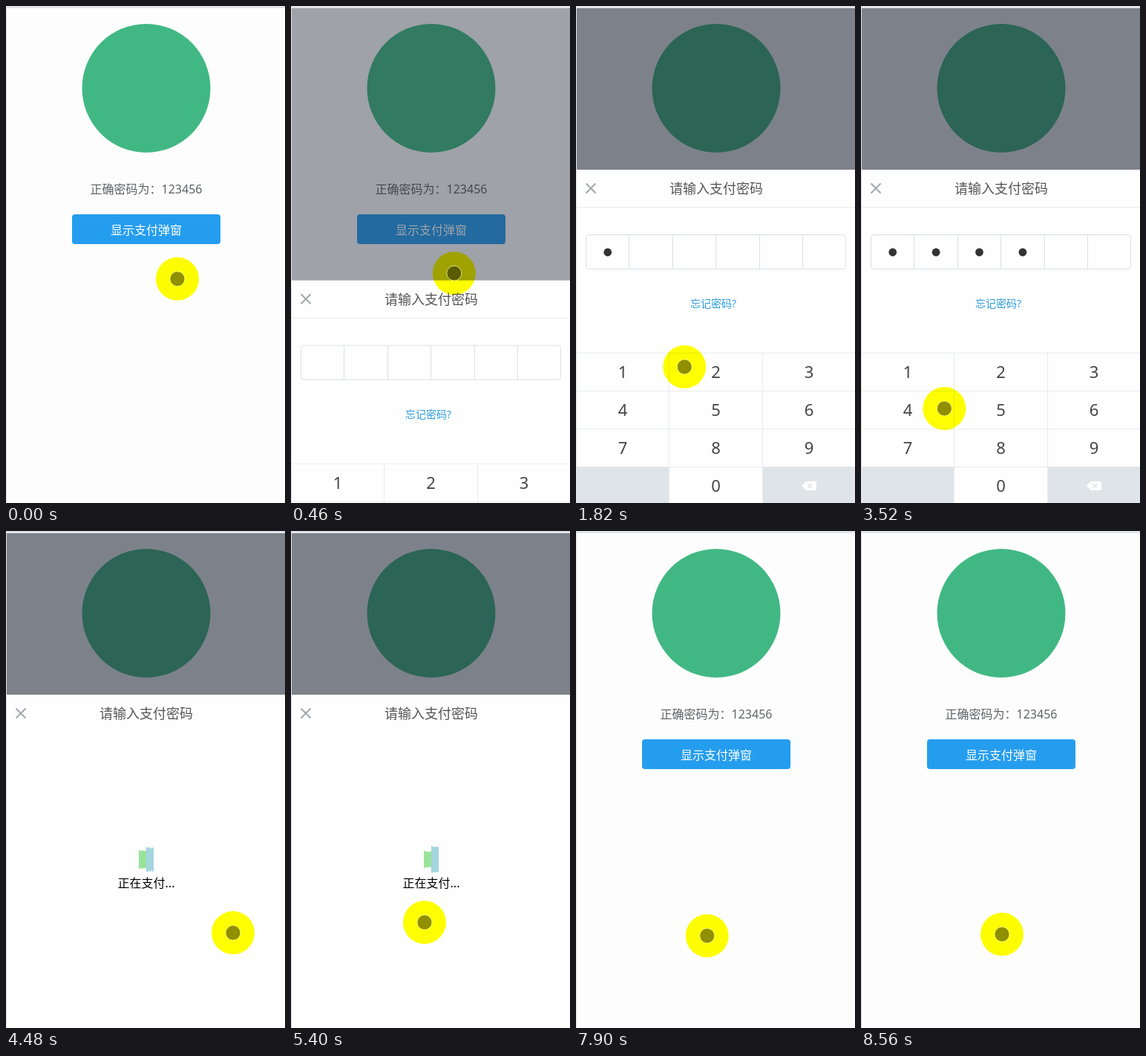
An HTML page for the animation above (8580 ms loop, 376x668 px).

```html
<!DOCTYPE html>
<html lang="zh-CN">
<head>
<meta charset="utf-8">
<title>支付弹窗</title>
<style>
  html, body { margin: 0; height: 100%; overflow: hidden; background: #fdfdfd; }
  svg { display: block; width: 100%; height: 100%; }
  text { font: 16px "Noto Sans", "Noto Sans CJK SC", "Noto Sans CJK", sans-serif; text-anchor: middle; }
  .line { fill: none; stroke: #e9ebed; }
  .key { font-size: 22px; fill: #444; }
  .glow { mix-blend-mode: multiply; }
</style>
</head>
<body>
<svg viewBox="0 0 376 668">
  <rect width="376" height="668" fill="#fdfdfd"/>
  <circle cx="189" cy="110.5" r="86.5" fill="#41b883"/>
  <text x="189" y="252" fill="#606266">正确密码为：123456</text>
  <rect x="89" y="280" width="200" height="40" rx="4" fill="#259def"/>
  <text x="189" y="307" fill="#fff">显示支付弹窗</text>
  <rect id="shade" width="376" height="668" fill="rgb(29,37,51)"/>

  <g id="sheet">
    <rect y="220" width="376" height="448" fill="#fefefe"/>
    <path d="M13.5 238.5l13 13m0-13l-13 13" stroke="#a3a7ad" stroke-width="2"/>
    <text x="189" y="252" style="font-size:18px" fill="#555">请输入支付密码</text>

    <g id="entry">
      <path class="line" d="M1 270.5h375"/>
      <rect x="13.5" y="307.5" width="350" height="46" rx="4" fill="none" stroke="#dcdfe2"/>
      <g id="cells"></g>
      <text x="185" y="405" style="font-size:14px" fill="#2a9cdb">忘记密码?</text>
      <path d="M1 619h125v49H1zM252 619h124v49H252z" fill="#dfe4e9"/>
      <path class="line" d="M1 466.5h375M1 517.5h375M1 568.5h375M1 619.5h375M125.5 466v202M251.5 466v202"/>
      <g id="keys"></g>
      <path d="M304 645l6-6h12q2 0 2 2v8q0 2-2 2h-12z" fill="#fff"/>
      <path d="M312 642l6 6m0-6l-6 6" stroke="#dfe4e9" stroke-width="1.5"/>
    </g>

    <g id="loading">
      <path id="barA" fill="#98e39a"/>
      <path id="barB" fill="#a5d5de"/>
      <text x="189" y="479">正在支付...</text>
    </g>

    <g id="success">
      <circle cx="189" cy="440" r="21" fill="#29dcb0"/>
      <path d="M178.5 440.5l7.5 7 13.5-14.5" fill="none" stroke="#fff" stroke-width="4" stroke-linecap="round"/>
      <text x="189" y="495">支付成功</text>
    </g>
  </g>

  <path d="M0 0H376V3H1V668H0z" fill="#e3e4e7"/>
  <g id="glow" class="glow">
    <circle r="29" fill="#ff0"/>
    <circle r="10" fill="#909000"/>
  </g>
  <circle id="ring" r="10" fill="none" stroke="#ffff9a" stroke-opacity=".75"/>
</svg>
<script>
const LOOP = 8580, SLIDE = 400, OPEN = 305, CLOSE = 7480, PAY = 4260, DONE = 6000;
const presses = [1500, 2100, 2620, 3300, 3820, 4200];
// time, x, y
const track = [
  [0, 231, 367], [230, 222, 308], [310, 222, 308], [460, 220, 359],
  [1300, 88, 487], [1520, 88, 487], [1820, 146, 485], [2020, 185, 487],
  [2150, 185, 487], [2500, 325, 490], [2680, 325, 490], [3200, 94, 541],
  [3380, 94, 541], [3520, 112, 541], [3750, 192, 541], [3880, 192, 541],
  [4120, 309, 541], [4400, 309, 541], [5180, 280, 532], [5400, 180, 526],
  [5600, 175, 527], [7240, 175, 527], [7260, 165, 538], [7700, 170, 545],
  [8300, 190, 542], [LOOP, 190, 542]
];
const $ = id => document.getElementById(id);
const clamp = v => Math.max(0, Math.min(1, v));
const show = (el, on) => el.style.display = on ? '' : 'none';

function add(parent, tag, attrs, label = '') {
  const el = document.createElementNS('http://www.w3.org/2000/svg', tag);
  for (const k in attrs) el.setAttribute(k, attrs[k]);
  el.textContent = label;
  parent.append(el);
  return el;
}

const dots = presses.map((_, i) => {
  const x = 13.5 + i * 58.4;
  if (i) add($('cells'), 'path', { d: `M${Math.floor(x) + .5} 308v45`, stroke: '#dcdfe2' });
  return add($('cells'), 'circle', { cx: x + 29.2, cy: 331, r: 5.4, fill: '#333' });
});
for (let n = 1; n <= 10; n++) {
  const i = n < 10 ? n - 1 : 10;
  add($('keys'), 'text', { class: 'key', x: 63 + i % 3 * 125.5, y: 500 + Math.floor(i / 3) * 51 }, n % 10);
}

function cursorAt(t) {
  const i = track.findIndex(p => p[0] > t);
  const a = track[i - 1], b = track[i], u = (t - a[0]) / (b[0] - a[0]);
  return [a[1] + (b[1] - a[1]) * u, a[2] + (b[2] - a[2]) * u];
}

const easeOut = (t, start, power) => 1 - (1 - clamp((t - start) / SLIDE)) ** power;
const opened = (t, power) => easeOut(t, OPEN, power) - easeOut(t, CLOSE, power);

// A bar of thin strips with uneven ends
function bar(id, x, height) {
  let d = '';
  for (let i = 0; i < 5; i++) {
    const h = height - (i * 3 % 5) * .8;
    d += `M${x + i * 2} ${441.5 - h / 2}h2v${h}h-2z`;
  }
  $(id).setAttribute('d', d);
}

function draw(t) {
  $('shade').setAttribute('opacity', .57 * opened(t, 2.67));
  $('sheet').setAttribute('transform', `translate(0 ${448 * (1 - opened(t, 2.23))})`);
  show($('entry'), t < PAY);
  show($('loading'), t >= PAY && t < DONE);
  show($('success'), t >= DONE);
  dots.forEach((dot, i) => show(dot, t >= presses[i]));

  const wave = 6.5 * Math.cos((t - 5400) / 800 * 2 * Math.PI);
  bar('barA', 179, 29.5 - wave);
  bar('barB', 189, 29.5 + wave);

  const move = `translate(${cursorAt(t)})`;
  $('glow').setAttribute('transform', move);
  $('ring').setAttribute('transform', move);
}

const start = performance.now();
function tick() {
  draw((performance.now() - start) % LOOP);
  requestAnimationFrame(tick);
}
tick();
</script>
</body>
</html>
```
